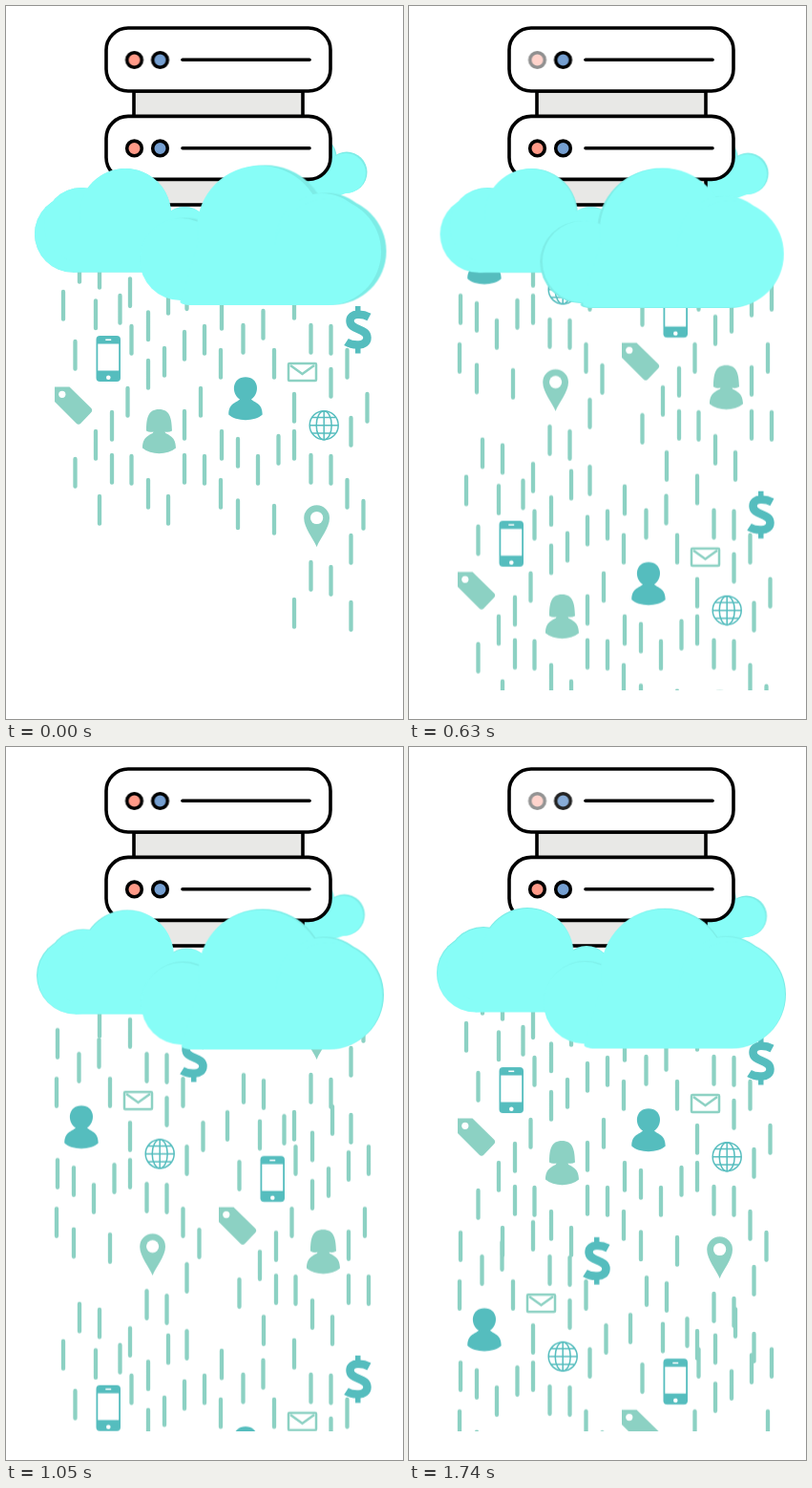
Recreate the animation shown at these times as an HTML page. Size 416x746 px, loop 1.77 s.

```html
<!DOCTYPE html>
<html lang="en">
<head>
<meta charset="utf-8">
<title>Cloud data rain</title>
<style>
  html, body { margin: 0; width: 100%; height: 100%; overflow: hidden; background: #fff; }
  svg { display: block; width: 416px; height: 746px; }

  .light { fill: #8cd1c3; }
  .teal { fill: #55bdbe; }
  .white { fill: #fff; }
  .drops { fill: none; stroke: #8cd1c3; stroke-width: 4.3; stroke-linecap: round; }
  .outline { fill: none; }
  .cloud { fill: #87fdf7; }
  .shade { fill: #7dece6; }
  .ink { stroke: #000; stroke-width: 3.6; stroke-linecap: round; }

  .rain { animation: fall 1.77s steps(59) infinite; }
  .next { animation-name: fall-next; }
  @keyframes fall { to { transform: translateY(543.9px); } }
  @keyframes fall-next { from { transform: translateY(-587.6px); } to { transform: none; } }

  .cloud, .shade, .led { animation: 1.77s linear infinite; }
  .back { animation-name: back; }
  .left.cloud { animation-name: left; }
  .left.shade { animation-name: left-shade; }
  .front.cloud { animation-name: front; }
  .front.shade { animation-name: front-shade; }
  .red { animation-name: blink-red; }
  .blue { animation-name: blink-blue; }

  @keyframes back {
    0%, 13.6% { transform: translate(0, 0); }
    27.1% { transform: translate(-1.5px, 1px); }
    59.3% { transform: translate(-2.5px, 1.5px); }
    100% { transform: translate(-3.5px, 3px); }
  }
  @keyframes left {
    0% { transform: translate(0, 0); }
    13.6% { transform: translate(-2px, 1px); }
    27.1% { transform: translate(1px, .5px); }
    44.1% { transform: translate(4px, 0); }
    59.3% { transform: translate(3px, 1px); }
    84.7% { transform: translate(-.5px, 0); }
    98.3%, 100% { transform: translate(-.5px, -1px); }
  }
  @keyframes left-shade {
    0% { transform: translate(0, 0); }
    13.6% { transform: translate(2.5px, .5px); }
    27.1% { transform: translate(3.5px, 0); }
    44.1% { transform: translate(4px, .3px); }
    59.3% { transform: translate(2px, .5px); }
    84.7% { transform: translate(-1px, -1px); }
    98.3%, 100% { transform: translate(-1px, -2px); }
  }
  @keyframes front {
    0% { transform: translate(0, -1px); }
    13.6% { transform: translate(2.5px, 0); }
    27.1% { transform: translate(.5px, 1px); }
    44.1% { transform: translate(-1px, 2px); }
    59.3% { transform: translate(1.5px, 2.5px); }
    84.7% { transform: translate(1.2px, 2px); }
    98.3%, 100% { transform: translate(1px, 1.5px); }
  }
  @keyframes front-shade {
    0% { transform: translate(5.5px, -1.5px); }
    13.6% { transform: translate(3.5px, -1px); }
    27.1% { transform: translate(-2.3px, 1px); }
    44.1% { transform: translate(-3px, 3px); }
    59.3% { transform: translate(3px, 1.5px); }
    84.7% { transform: translate(2px, 1.3px); }
    98.3%, 100% { transform: translate(2px, .8px); }
  }
  @keyframes blink-red {
    0%, 32% { opacity: 1; }
    38.5% { opacity: 0; }
    46%, 93% { opacity: 1; }
    98.3%, 100% { opacity: .42; }
  }
  @keyframes blink-blue {
    0%, 82% { opacity: 1; }
    84.7% { opacity: .76; }
    91.5% { opacity: 0; }
    98.3%, 100% { opacity: .86; }
  }
</style>
</head>
<body>
<svg viewBox="0 0 416 746" width="416" height="746">
  <defs>
    <clipPath id="sky"><rect x="27" y="250" width="372" height="466"/></clipPath>

    <g id="cloud-left">
      <circle cx="70" cy="238.5" r="40"/>
      <circle cx="79" cy="229" r="39"/>
      <circle cx="125" cy="218" r="48"/>
      <circle cx="187" cy="236" r="26"/>
      <path d="M70 225H200V278.5H70Z"/>
    </g>
    <g id="cloud-front">
      <circle cx="183" cy="266" r="43"/>
      <circle cx="266" cy="234" r="66"/>
      <circle cx="331" cy="246" r="49"/>
      <circle cx="337" cy="258" r="56"/>
      <path d="M183 309C180 312 188 314 194 314H337V250H200Z"/>
    </g>

    <g id="half-left">
      <path class="drops" id="drops-left"/>
      <g id="phone">
        <rect class="teal" x="94.5" y="345" width="25.5" height="48" rx="4"/>
        <path class="white" d="M96.3 353.5H118.2V381.5H96.3ZM104.3 348.6H110.2V350.1H104.3Z"/>
        <circle class="white" cx="107.3" cy="388.7" r="2.3"/>
      </g>
      <g id="tag">
        <path class="light" d="M51 398.5H66.5L89 420.5Q91.5 423 89 425.5L78.500 436.500Q76 439 73.500 436.500L51 414Z"/>
        <circle class="white" cx="58.800" cy="406.300" r="3.600"/>
      </g>
      <path id="woman" class="light" d="M147 444.500C147 431 149 422 160.300 422S173.700 431 174 444.500Q170.500 446.500 166.500 445.500C167 449 178 448 178 462.500C169 470 152 470 143 462.500C143 448 154 449 154.500 445.500Q150 446.500 147 444.500Z"/>
    </g>

    <g id="half-right">
      <path class="drops" id="drops-right"/>
      <path id="user" class="teal" d="M233.300 427.500C233.300 415.500 241 415.500 245 411.500C235.500 405 237 388.200 251 388.200S266.500 405 257 411.500C261 415.500 268.700 415.500 268.700 427.500C261 435 241 435 233.300 427.500Z"/>
      <g id="mail" class="outline" stroke="#8cd1c3" stroke-width="2.5">
        <rect x="296" y="374" width="29" height="18" rx="1"/>
        <path d="M298 376L310.500 385L323 376"/>
      </g>
      <g id="globe" class="outline" stroke="#55bdbe" stroke-width="1.5">
        <circle cx="333.200" cy="438.700" r="15"/>
        <ellipse cx="333.200" cy="438.700" rx="8" ry="15"/>
        <path d="M333.200 423.700V453.700M318.200 438.700H348.200M321 430.500H345.400M321 447H345.400"/>
      </g>
      <g id="pin">
        <path class="light" d="M325.600 566C322 557 312.200 546 312.200 535.700A13.400 13.400 0 0 1 339 535.700C339 546 329 557 325.600 566Z"/>
        <circle class="white" cx="325.600" cy="535.500" r="6.600"/>
      </g>
      <g id="dollar">
        <path class="outline" stroke="#55bdbe" stroke-width="8.500" d="M380.500 325.500C374 322 360.500 320.500 360.500 329.500C360.500 340 378.500 336.500 378.500 347C378.500 357.500 362 355 356.500 351.500"/>
        <path class="teal" d="M366 314H371.500V322H366ZM366 355H371.500V363.500H366Z"/>
      </g>
    </g>

    <!-- The upper half of the pattern is the lower one with its sides swapped -->
    <g id="pattern">
      <use href="#half-left"/>
      <use href="#half-right"/>
      <use href="#half-left" x="172" y="-239.700"/>
      <use href="#half-right" x="-172" y="-335.700"/>
    </g>

    <g id="box">
      <rect class="white ink" x="105" y="23" width="235" height="66" rx="23"/>
      <path class="ink" d="M185 56.300H318"/>
    </g>
    <circle id="led" cy="56.500" r="7.800" class="ink"/>
  </defs>

  <g class="back shade">
    <circle cx="325" cy="158" r="21.500"/>
    <circle cx="357" cy="174" r="21.500"/>
  </g>
  <g class="back cloud">
    <circle cx="324" cy="159" r="21.500"/>
    <circle cx="356" cy="175" r="21"/>
    <path d="M313 176H356V196L345 200H313Z"/>
  </g>

  <g fill="#e8e8e6" class="ink">
    <rect x="134" y="89" width="177" height="27"/>
    <rect x="134" y="181" width="177" height="27"/>
  </g>
  <use href="#box"/>
  <use href="#led" class="led red" x="134.500" fill="#ff9a88"/>
  <use href="#led" class="led blue" x="161.500" fill="#759fd1"/>
  <g transform="translate(0 92.400)">
    <use href="#box"/>
    <use href="#led" x="134.500" fill="#ff9a88"/>
    <use href="#led" x="161.500" fill="#759fd1"/>
  </g>

  <g clip-path="url(#sky)">
    <g class="rain"><use href="#pattern"/></g>
    <g class="rain next"><use href="#pattern"/></g>
  </g>

  <use href="#cloud-left" class="left shade"/>
  <use href="#cloud-left" class="left cloud"/>
  <use href="#cloud-front" class="front shade"/>
  <use href="#cloud-front" class="front cloud"/>
</svg>
<script>
  // Each drop: column x, then the tops of the drops in that column
  const left = [
    [60, 297], [72.5, 349, 472], [77, 258], [94, 306.5, 443], [98, 264, 511],
    [111, 423, 468], [119.5, 301], [127.5, 398], [131.5, 333, 469],
    [149, 318.5, 369, 494], [166, 356], [170, 291, 511],
    [187, 339, 422, 468], [204, 398], [208, 333, 469]
  ];
  const right = [
    [225, 358, 494], [226, 307, 443], [243, 451, 515.5], [248.5, 332], [264, 469],
    [269.5, 317], [281, 358, 521], [285.5, 448], [302, 296, 404, 443, 619],
    [319.5, 332, 468, 580], [340.5, 333, 378, 469, 585], [357.5, 358, 494],
    [361.5, 429, 552, 622], [374.5, 516], [378.5, 404]
  ];
  const dropPath = columns => columns
    .map(([x, ...tops]) => tops.map(y => `M${x} ${y + 2}v28.7`).join(''))
    .join('');

  document.getElementById('drops-left').setAttribute('d', dropPath(left));
  document.getElementById('drops-right').setAttribute('d', dropPath(right));
</script>
</body>
</html>
```
